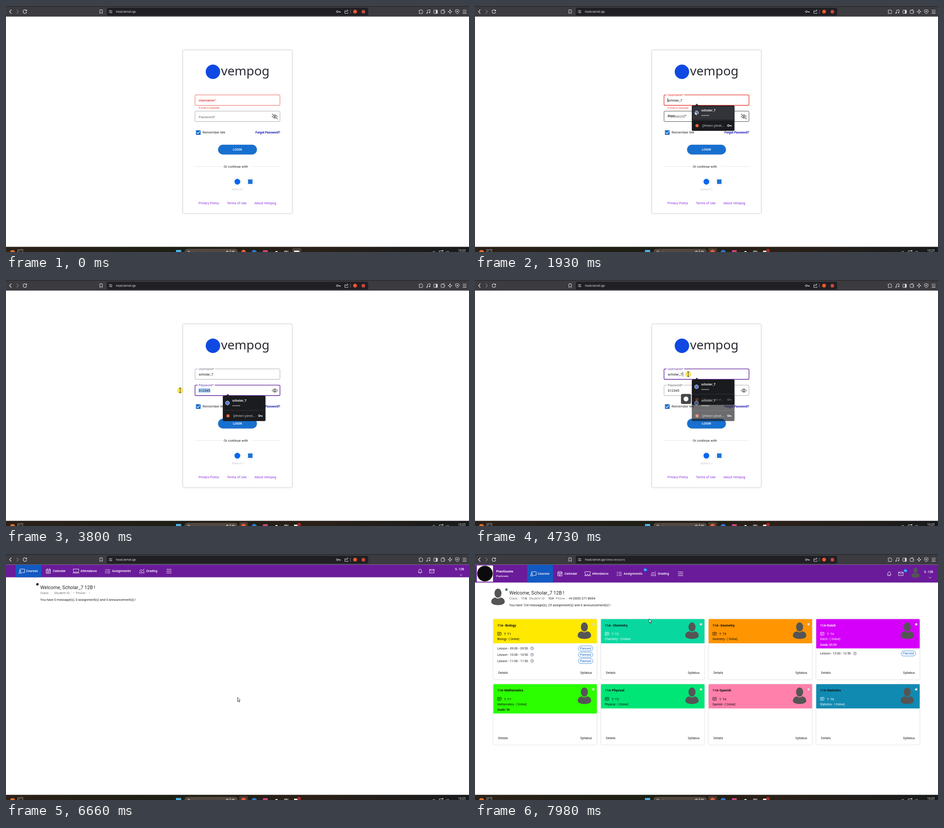
Recreate the animation shown at these times as an HTML page. Size 1027 by 546 pixels, loop 8000 ms.

```html
<!DOCTYPE html>
<html lang="en">
<head>
<meta charset="utf-8">
<title>Sign in</title>
<style>
html,body{margin:0;width:100%;height:100%;overflow:hidden;background:#fff}
svg{display:block;width:100%;height:100%}
text{font-family:Roboto,sans-serif;white-space:pre}
.ui{font-family:"Noto Sans","Open Sans",sans-serif}
.sh{filter:drop-shadow(0 .7px 1.3px rgba(0,0,0,.28))}
</style>
</head>
<body>
<svg id="stage" viewBox="0 0 1027 546" xmlns="http://www.w3.org/2000/svg"></svg>
<script>
const LOOP = 8000, USER = 'scholar_7', HOST = 'host.tervil.qx';
const stage = document.getElementById('stage');

// Markup helpers
const txt = (x, y, size, str, fill = '#222', extra = '') =>
  `<text x="${x}" y="${y}" font-size="${size}" fill="${fill}" ${extra}>${str}</text>`;
const rect = (x, y, w, h, fill, extra = '') =>
  `<rect x="${x}" y="${y}" width="${w}" height="${h}" fill="${fill}" ${extra}/>`;
const disc = (x, y, r, fill, extra = '') => `<circle cx="${x}" cy="${y}" r="${r}" fill="${fill}" ${extra}/>`;
const line = (d, color, w = 1, extra = '') =>
  `<path d="${d}" fill="none" stroke="${color}" stroke-width="${w}" stroke-linecap="round" stroke-linejoin="round" ${extra}/>`;
const at = (x, y, body, extra = '') => `<g transform="translate(${x} ${y})" ${extra}>${body}</g>`;
const group = (id, body, extra = '') => `<g id="${id}" ${extra}>${body}</g>`;
const B = 'font-weight="500"', BB = 'font-weight="700"', MID = 'text-anchor="middle"', END = 'text-anchor="end"', UI = 'class="ui"';
const keyIcon = c => disc(-2, 0, 2, 'none', `stroke="${c}" stroke-width="1.2"`) + line('M0 0H4.5V1.8M2.6 0V1.5', c, 1.2);

function browserBar() {
  const c = '#dcdce0';
  return rect(0, 0, 1027, 23.5, '#3b3b40') + rect(0, 0, 1027, 1.5, '#2a2a2e') +
    line('M11.5 8.5L7.8 12.5L11.5 16.5', c, 1.3) + line('M24 8.5L27.7 12.5L24 16.5', '#77777c', 1.2) +
    line('M45.3 10.3A4 4 0 1 0 45.8 13.5M45.8 8.5V10.9H43.4', c, 1.2) +
    line('M208.5 8.5H213.7V16.5L211.1 14.5L208.5 16.5Z', c) +
    rect(223.5, 4, 580, 17.3, '#202024', 'rx="3.5"') +
    line('M228.5 10.7H230M233 10.7H235.5M228.5 14.4H231.5M234.5 14.4H235.5', c, .9) +
    disc(231.5, 10.7, 1.2, 'none', `stroke="${c}" stroke-width=".8"`) + disc(233, 14.4, 1.2, 'none', `stroke="${c}" stroke-width=".8"`) +
    txt(244, 15.2, 7.2, HOST + '<tspan id="path" fill="#c4c4c8">/view-lessons</tspan>', '#f0f0f2', UI) +
    at(737, 12.5, keyIcon('#c8c8cc')) +
    line('M754 10.5H751.5V16.5H758.5V14.5M753.5 13.5Q754.5 10 758.5 10M756.7 8L758.8 10L756.7 12', c, .9) +
    line('M764 8.5V16.5', '#88888c', .9) + disc(774.3, 12.5, 4.3, '#f4552a') + disc(792.7, 12.7, 4, '#c9473f') +
    line('M916.5 9.5H918.5A1.5 1.5 0 0 1 921.5 9.5H923.7V11.7A1.4 1.4 0 0 1 923.7 14.4V16.7H916.5V14.6A1.4 1.4 0 0 0 916.5 11.7Z', c) +
    line('M935 15.5V9.5L940.5 8.3V14.5', c) + disc(933.8, 15.6, 1.3, c) + disc(939.3, 14.6, 1.3, c) +
    rect(949, 9, 8, 7.5, 'none', `rx="1" stroke="${c}"`) + rect(953.5, 9, 3.5, 7.5, c) +
    rect(965, 9.5, 8, 7, 'none', `rx="1.2" stroke="${c}"`) + line('M966 9.5L971.5 8M970.5 13H973', c) +
    line('M985 8L986.2 11.3L989.5 12.5L986.2 13.7L985 17L983.8 13.7L980.5 12.5L983.8 11.3Z', c) +
    line('M1001 8L1005 9.3V12.5Q1004.5 15.5 1001 17.2Q997.5 15.5 997 12.5V9.3Z', c) + disc(1001, 12.2, 1.4, c) +
    line('M1013.5 9.3H1021M1013.5 12.7H1021M1013.5 16.1H1021', c, 1.1);
}

function taskbar() {
  return rect(0, 534.5, 1027, 12, 'url(#dusk)') +
    disc(14.5, 547, 5.5, '#e0702c') + txt(25, 545.3, 6.3, '21°C', '#f0f0f0', UI) +
    rect(377, 541.5, 11.5, 6, '#4cb4ec') +
    rect(396, 539, 118, 12, '#51483f', 'rx="6"') + disc(405.5, 546.5, 2.6, 'none', 'stroke="#ddd"') +
    disc(418, 546, .7, '#ddd') + line('M488 546L491 543.5L494 546M497.5 546V542.5M501 544.5H507', '#d9d0c4', 1.4) +
    rect(517.5, 537.5, 19, 9, '#4a3c30', 'id="tabA" rx="2"') + disc(527, 546, 5, '#ee5a3c') +
    disc(550.5, 547, 5.8, '#2b78d4') + rect(570, 542, 10.5, 6, '#d2447e') + disc(600, 546.5, 2.8, '#eee') +
    txt(617, 547, 5.5, 'EBC', '#e8e8e8', BB) +
    rect(635, 537.5, 20, 9, '#4a4238', 'id="tabB" rx="2"') + rect(639, 543, 11.5, 4, '#f4f4f4') +
    disc(650, 543, 4, '#a5281f', 'id="alert"') +
    line('M946.5 546L949 544.3L951.5 546M961 547V543.5H969V547M967 542.5L970 542.5M975.5 546H977.5L979.5 544M981.5 544.5V546', '#ddd', .9) +
    txt(1003, 545.3, 6.4, '10:25', '#f2f2f2', UI);
}

const popup = id => group(id,
  `<path d="M488 221.5L492 216.7L496 221.5Z" fill="#2b2c31"/>` +
  rect(481, 221, 94.5, 56, '#1b1c1f', `id="${id}Bg" rx="2"`) +
  rect(482.5, 222.5, 91.5, 29.5, '#33343a', `id="${id}Row" rx="2"`) +
  line('M481 253.5H575.5', '#45464b', .6) +
  disc(491.3, 237, 4.2, '#4b76d8', 'stroke="#fff" stroke-width=".9"') +
  txt(502, 234, 6.8, USER, '#f4f4f6', `${UI} font-weight="600"`) +
  [0, 1, 2, 3, 4, 5].map(i => disc(503.5 + i * 2.9, 243, 1, '#d8d8dc')).join('') +
  disc(492.5, 265.5, 3.6, '#ec6038') + txt(504, 268, 6.6, 'Şifreleri yönet...', '#cfcfd3', UI) +
  at(564, 265.3, keyIcon('#e4e4e8')), 'class="sh"');

const chip = id => group(id, rect(-11, -11, 22, 22, '#45474b', 'rx="3.5"') + disc(0, 0, 5.4, '#fff'), 'class="sh"');

function loginPage() {
  const eye = line('M-6 0Q0 -8 6 0Q0 8 -6 0Z', '#333', 1) + disc(0, 0, 2, 'none', 'stroke="#333" stroke-width="1.1"');
  return rect(392.3, 97.8, 242.4, 362.6, '#fff', 'rx="3" stroke="#dedede" stroke-width=".8" class="sh"') +
    disc(459, 146, 16, '#1049e2') +
    txt(477, 154.3, 28, 'vempog', '#2b2a33', UI) +
    rect(419.3, 197.3, 188.4, 23.2, '#fff', 'id="uBox" rx="2.2"') +
    rect(425, 195, 39, 4, '#fff', 'id="uGap"') +
    rect(427, 204, 33, 10, '#a9cdfa', 'id="uSel"') +
    txt(427.3, 200, 7, 'Username*', '#e53935', 'id="uLab"') + txt(427.5, 211.5, 7.5, USER, '#111', 'id="uVal"') +
    txt(427.3, 228.2, 6, 'E-mail is required', '#e53935', 'id="err"') +
    rect(419.3, 233.3, 188.4, 23.2, '#fff', 'id="pBox" rx="2.2"') +
    rect(425, 231, 38, 4, '#fff', 'id="pGap"') +
    rect(427, 240, 26, 10, '#a9cdfa', 'id="pSel"') +
    txt(427.3, 248.7, 7.5, 'Password*', '#6b6b6b', 'id="pLab"') +
    group('dots', [0, 1, 2, 3, 4, 5].map(i => disc(428.8 + i * 2.7, 244, 1.05, '#111')).join('')) +
    txt(427.5, 247.6, 7.5, 'S12345', '#111', 'id="pVal"') +
    at(596.3, 245.3, eye + group('slash', line('M-5.5 -5.5L5.5 5.5', '#fff', 2.6) + line('M-5.5 -5.5L5.5 5.5', '#333', 1.1))) +
    rect(427, 204, .8, 10, '#111', 'id="caret"') +
    rect(421.3, 275.7, 10.4, 10.4, '#176bc9', 'rx="1.2"') + line('M423.3 281L425.6 283.4L429.9 278.4', '#fff', 1.2) +
    txt(436, 283.3, 7.5, 'Remember Me', '#222', 'letter-spacing=".13"') +
    txt(608, 283.2, 6.75, 'Forgot Password?', '#1a1ab4', `${BB} ${END}`) +
    rect(470.5, 308, 86, 21.4, '#1770cf', 'id="btn" rx="10.7" class="sh"') +
    txt(513.4, 321, 7, 'LOGIN', '#fff', `${B} ${MID}`) +
    line('M419 356.2H480M546 356.2H608', '#dcdcdc', .7) + txt(509.7, 358.5, 7.4, 'Or continue with', '#222', MID) +
    disc(513.2, 390, 8.8, '#fff', 'stroke="#e2e2e2" stroke-width=".8"') + disc(513.2, 390, 6.4, '#0866f0') +
    disc(541.7, 390, 8.8, '#fff', 'stroke="#e2e2e2" stroke-width=".8"') + rect(536.8, 384.9, 10, 10, '#1f72d6') +
    txt(513.5, 409, 4.6, '2024ver.21.2', '#bbb', MID) +
    txt(427, 439.5, 7.4, 'Privacy Policy', '#8a2fe0') + txt(490, 439.5, 7.4, 'Terms of Use', '#8a2fe0') +
    txt(551, 439.5, 7.3, 'About Vempog', '#8a2fe0') +
    popup('popU') + at(0, 36, popup('popP')) + at(468, 264, chip('chipP')) + at(474.7, 228.5, chip('chipU'));
}

const icons = {
  board: line('M-4 -4.5H6.5V3.5H1M-3.5 -.5H-3.4M-6.3 4.5Q-6.3 1.8 -3.5 1.8Q-.7 1.8 -.7 4.5Z', '#fff', .9) + disc(-3.5, -.8, 1.6, 'none', 'stroke="#fff" stroke-width=".9"'),
  cal: line('M-4.5 -3.8H4.5V5H-4.5ZM-4.5 -1H4.5M-2.5 -5.2V-3M2.5 -5.2V-3M-2.5 1.2H2.5M-2.5 3.2H1', '#fff', .9),
  group: line('M-6 -.5V-4.5H6V-.5M-6.5 5V3.6H-2.7V5M-1.9 5V3.6H1.9V5M2.7 5V3.6H6.5V5', '#fff', .9) + [-4.6, 0, 4.6].map(x => disc(x, 1.6, 1.1, '#fff')).join(''),
  list: line('M-5 -3.2L-4 -2.3L-2.4 -4.2M-5 .5L-4 1.4L-2.4 -.4M-5 4L-2.6 4M-.5 -3H5.2M-.5 .5H5.2M-.5 4H5.2', '#fff', .9),
  chart: line('M-4.5 5V2M-1.5 5V.5M1.5 5V2M4.5 5V-.5M-5 -.5L-1.5 -3L1.3 -1L5 -4.8', '#fff', 1)
};
const tabs = [['board', 34.8, 44.5, 'Courses'], ['cal', 94, 104, 'Calendar'], ['group', 155.3, 165.3, 'Attendance'],
  ['list', 225.3, 235.3, 'Assignments'], ['chart', 301.3, 311, 'Grading']];

function nav(h, dx) {
  const cy = 24 + h / 2;
  return rect(0, 23.7, 1027, h, '#6a1b9a', 'class="sh"') + rect(21.3 + dx, 23.7, 57.2, h, '#1259c2') +
    tabs.map(([ic, ix, tx, name]) => at(ix + dx, cy, icons[ic]) + txt(tx + dx, cy + 1.9, 7.05, name, '#fff', B)).join('') +
    line(`M${356.3 + dx} ${cy - 3.8}h10.5m-10.5 4h10.5m-10.5 4h10.5`, '#fff', 1) +
    line(`M914.5 ${cy + 3}h8.4q-1.4-1.2-1.4-4.4q-.3-3-2.8-3t-2.8 3q0 3.2-1.4 4.4m3.2 1.7h2`, '#fff', .9) +
    line(`M939.8 ${cy - 3.5}h9.8v7.6h-9.8zl4.9 4.2l4.9-4.2`, '#fff', .9) +
    txt(1006, cy - 2, 6.9, 'S. 12B', '#fff', `${B} ${MID}`) + line(`M1007 ${cy + 7.6}l2.3 2.2l2.3-2.2`, '#fff', .9);
}

const avatar = (x, y, k = 1) => `<g transform="translate(${x} ${y}) scale(${k})" fill="#555"><ellipse cy="-8" rx="7.8" ry="10.2"/><path d="M-15 12Q-15 3 -6 1.5Q0 6 6 1.5Q15 3 15 12Q13 18.5 0 18.5Q-13 18.5 -15 12Z"/></g>`;
const badge = (x, y) => disc(x, y, 4.4, '#1565d8') + txt(x, y + 1.6, 4.6, '9+', '#fff', `${BB} ${MID}`);
const hello = y => txt(76, y, 10.65, 'Welcome, Scholar_7 12B !', '#222');
const grey = (x, y, s) => txt(x, y, 7.2, s, '#777', 'letter-spacing=".1"');
const message = (y, a, b) => txt(76, y, 7.2, `You have ${a} message(s), ${b} assignment(s) and 0 announcement(s) !`, '#222', 'letter-spacing=".02"');

function shellPage() {
  return nav(27.8, 0) + disc(69.7, 67.2, 2.7, '#1d1d3c') + hello(77.7) +
    grey(76, 89, 'Class :') + grey(107, 89, 'Student ID :') + grey(149, 89, '•') + grey(155, 89, 'Phone :') + grey(184, 89, '•') +
    message(104, 0, 0);
}

// title, teacher, header colour, grade, lesson times
const courses = [
  ['11A- Biology', 'T1', '#ffe900', '', ['09:00 - 09:50', '10:00 - 10:50', '11:00 - 11:50']],
  ['11A- Chemistry', 'T2', '#08d8a0', ''], ['11A- Geometry', 'T5', '#ff9500', ''],
  ['11A-Dutch', 'T4', '#d500f9', '69.55', ['12:00 - 12:50']],
  ['11A-Mathematics', 'T7', '#2bff00', '90'], ['11A-Physical', 'T3', '#00e676', ''],
  ['11A-Spanish', 'T4', '#ff80ab', ''], ['11A-Statistics', 'T6', '#118ab2', '']];

function card([title, teacher, color, grade, times = []], i) {
  const ink = i === 3 || i === 1 || i === 7 ? '#fff' : '#111', h = grade ? 65 : 53.7;
  return at(40.8 + i % 4 * 238.7, i < 4 ? 144.5 : 289,
    rect(0, 0, 229.5, 134, '#fff', 'rx="2" class="sh"') + rect(0, 0, 229.5, h, color, 'rx="1.5"') +
    txt(8.6, 16, 7.15, title, i === 3 ? '#fff' : '#111', BB) +
    line('M9.6 29.3H17.2V35.3H14L12.3 37V35.3H9.6ZM11.5 31.4H15.3M11.5 33.2H14', ink, .8) +
    txt(23.5, 35.5, 7.4, 'T. ' + teacher, ink) +
    txt(8.6, 46.8, 6.3, title.replace(/^11A- ?/, '') + ' - ( Online)', ink) +
    (grade ? txt(8.6, 59.4, 6.4, 'Grade: ' + grade, ink, B) : '') +
    avatar(201.8, 25.5) + disc(221.7, 11.5, 2.7, '#dadada') +
    times.map((s, k) => {
      const y = h + 11.3 + k * 14;
      return txt(8.6, y + 2.5, 6.9, 'Lesson - ' + s, '#222', 'letter-spacing=".05"') +
        disc(85.8, y, 3.1, 'none', 'stroke="#44506a" stroke-width=".8"') + line(`M85.8 ${y - 1.7}v1.8h1.4`, '#44506a', .7) +
        rect(188.3, y - 5.6, 32.2, 11.2, '#fff', 'rx="5.6" stroke="#1976d2" stroke-width=".8"') +
        txt(204.4, y + 2.4, 6.9, 'Planned', '#1565c0', MID);
    }).join('') +
    txt(10.7, 121.6, 7, 'Details', '#222') + txt(218.7, 121.6, 7, 'Syllabus', '#222', END));
}

function homePage() {
  return nav(39.5, 94.5) + rect(4, 25.5, 36, 36, '#fff') + disc(22, 43.5, 17.3, '#0b0b0d') +
    txt(47, 41.3, 7.4, 'Practicums', '#fff', BB) + txt(47, 51.3, 5.3, 'Practicums', '#fff', B) +
    badge(378, 35) + badge(955, 37) + avatar(977, 41.5, .6) +
    avatar(51, 95) + disc(69.7, 79, 2.7, '#40706c') + hello(89.7) +
    grey(76, 101.2, 'Class :') + grey(120, 101.2, 'Student ID :') + grey(179, 101.2, 'Phone :') +
    group('facts', txt(102.5, 101.2, 7.3, '11A') + txt(162, 101.2, 7.3, '104') + txt(207.7, 101.2, 7.2, '+0 (000) 271-8064')) +
    group('msg', message(116, 124, 25)) + group('cards', courses.map(card).join(''));
}

const arrow = '<path d="M0 0V8.8L2 7L3.4 10.2L4.9 9.5L3.5 6.5H6.1Z" fill="#fff" stroke="#111" stroke-width=".8"/>';
const beam = line('M-1.8 -5H1.8M0 -5V5M-1.8 5H1.8', '#222', .9);
const hand = '<path d="M-1 1Q0 -1 1 1V4L4.4 5Q5 6 4.2 10H-.8L-3.4 6Q-3 4.4 -1 6Z" fill="#fff" stroke="#111" stroke-width=".8"/>';

stage.innerHTML = `<defs><linearGradient id="dusk"><stop stop-color="#2b2119"/><stop offset=".35" stop-color="#1d1e14"/><stop offset=".65" stop-color="#2a2018"/><stop offset="1" stop-color="#171a1c"/></linearGradient></defs>` +
  rect(0, 0, 1027, 546, '#fff') + group('login', loginPage()) + group('shell', shellPage()) + group('home', homePage()) +
  browserBar() + taskbar() +
  group('mouse', disc(0, 0, 6.7, '#f5e13c', 'id="halo" opacity=".82"') + group('arrow', arrow) + group('beam', beam) + group('hand', hand));

const el = {};
stage.querySelectorAll('[id]').forEach(n => el[n.id] = n);
const show = (id, on) => el[id].style.display = on ? '' : 'none';
const set = (id, o) => { for (const k in o) el[id].setAttribute(k, o[k]); };
const within = (t, ...spans) => spans.some(([a, b]) => t >= a && t < b);
const ramp = (t, a, b) => Math.min(1, Math.max(0, (t - a) / (b - a)));
const ease = p => p * p * (3 - 2 * p);

// Pointer stops: time, x, y
const track = [[70, 648, 552], [330, 560, 212], [790, 560, 212], [1000, 540, 245], [1250, 500, 232], [1530, 473, 209],
  [1860, 473, 209], [1930, 488, 234], [2080, 488, 234], [2330, 516, 316], [2660, 580, 257], [2720, 580, 257],
  [2930, 597, 246], [3070, 597, 246], [3260, 453, 245], [3530, 453, 245], [3900, 372, 245], [4130, 372, 245],
  [4330, 473, 222], [4400, 473, 222], [4530, 473, 209], [4760, 473, 209], [5090, 363, 209], [5260, 363, 209],
  [5790, 513.5, 318.5], [7580, 513.5, 318.5], [7980, 386, 144]];
function pointer(t) {
  const i = track.findIndex(k => k[0] > t);
  if (i === 0) return track[0].slice(1);
  if (i < 0) return track[track.length - 1].slice(1);
  const [a, x, y] = track[i - 1], [b, u, v] = track[i], p = ease((t - a) / (b - a));
  return [x + (u - x) * p, y + (v - y) * p];
}

function drawLogin(t, x, y) {
  const filled = t >= 2080, error = !filled, shown = t >= 3030;
  const uFocus = within(t, [1600, 3270], [4590, 5985]), pFocus = within(t, [3270, 4590]);
  const overP = x > 419 && x < 608 && y > 233 && y < 258;
  const frame = (focus, hover) => focus ? '#5b1b96' : hover ? '#222' : '#979797';
  set('uBox', { stroke: error ? '#e5392f' : frame(uFocus, false), 'stroke-width': uFocus ? 1.3 : .8 });
  set('pBox', { stroke: frame(pFocus, overP), 'stroke-width': pFocus ? 1.3 : .8 });
  const lift = ease(ramp(t, 1595, 1730));
  set('uLab', { y: 212.4 - 12.4 * lift, 'font-size': 7.5 - .5 * lift, 'font-weight': lift < .5 ? 500 : 400,
    fill: error ? '#e53935' : uFocus ? '#7046a8' : '#77708a' });
  show('uGap', lift > .5);
  show('err', error);
  show('uVal', t >= 1900);
  const preview = within(t, [1900, 2080]);
  set('pLab', { y: filled ? 236 : preview ? 248.3 : 248.7, 'font-size': filled ? 6.9 : preview ? 8.7 : 7.5, fill: pFocus ? '#7046a8' : '#6b6b6b' });
  show('pGap', filled);
  show('dots', t >= 1900 && !shown);
  show('pVal', shown);
  show('slash', !shown);
  const pFrom = Math.max(427, Math.min(453, x)), uFrom = Math.max(427, Math.min(460.5, x));
  const pSel = within(t, [3530, 4590]), uSel = within(t, [4760, 5985]);
  show('pSel', pSel);
  show('uSel', uSel);
  if (pSel) { const a = t > 3900 ? 427 : pFrom; set('pSel', { x: a, width: 453 - a }); }
  if (uSel) { const a = t > 5090 ? 427 : uFrom; set('uSel', { x: a, width: 460.5 - a }); }
  show('caret', (uFocus && !uSel) || (pFocus && !pSel));
  set('caret', { x: pFocus ? 453 : filled ? 460.6 : 427, y: pFocus ? 240 : 204 });
  set('btn', { fill: x > 470 && x < 557 && y > 308 && y < 330 ? '#307fd3' : '#1770cf' });
  const first = ramp(t, 1600, 1700) * (1 - ramp(t, 2080, 2200)), second = ramp(t, 4650, 4730);
  el.popU.style.opacity = Math.max(first, second);
  el.popP.style.opacity = ramp(t, 3290, 3410) * (1 - ramp(t, 4660, 4860));
  show('popURow', within(t, [1900, 2200]));
  show('popPRow', false);
  set('popUBg', { fill: t > 4860 ? '#292a2f' : '#1a1b1e' });
  show('chipP', within(t, [4200, 4860]));
  show('chipU', t >= 5150);
}

function draw(t) {
  const [x, y] = pointer(t), login = t < 6190;
  show('login', login);
  show('shell', within(t, [6390, 6860]));
  show('home', t >= 6860);
  show('path', t >= 6860);
  show('facts', t >= 7050);
  show('msg', t >= 7050);
  show('cards', t >= 7120);
  show('tabB', t < 130);
  show('tabA', t >= 1600);
  show('alert', t >= 1600);
  if (login) drawLogin(t, x, y);
  const overField = x > 419 && x < 585 && ((y > 197 && y < 221) || (y > 233 && y < 256.5));
  const dragging = within(t, [3530, 4130], [4760, 5150]);
  const isBeam = login && !within(t, [1900, 2150]) && (overField || dragging);
  const isHand = login && ((x > 470 && x < 557 && y > 308 && y < 330) || (x > 588 && x < 605 && y > 236 && y < 254));
  show('mouse', t >= 70);
  show('beam', isBeam);
  show('hand', isHand && !isBeam);
  show('arrow', !isBeam && !isHand);
  show('halo', within(t, [1500, 1690], [2040, 2180], [2990, 3130], [3260, 3400], [3530, 4000], [4590, 5130], [5985, 6130]));
  set('mouse', { transform: `translate(${x.toFixed(2)} ${y.toFixed(2)})` });
}

const start = performance.now();
function tick() {
  draw((performance.now() - start) % LOOP);
  requestAnimationFrame(tick);
}
tick();
</script>
</body>
</html>
```
